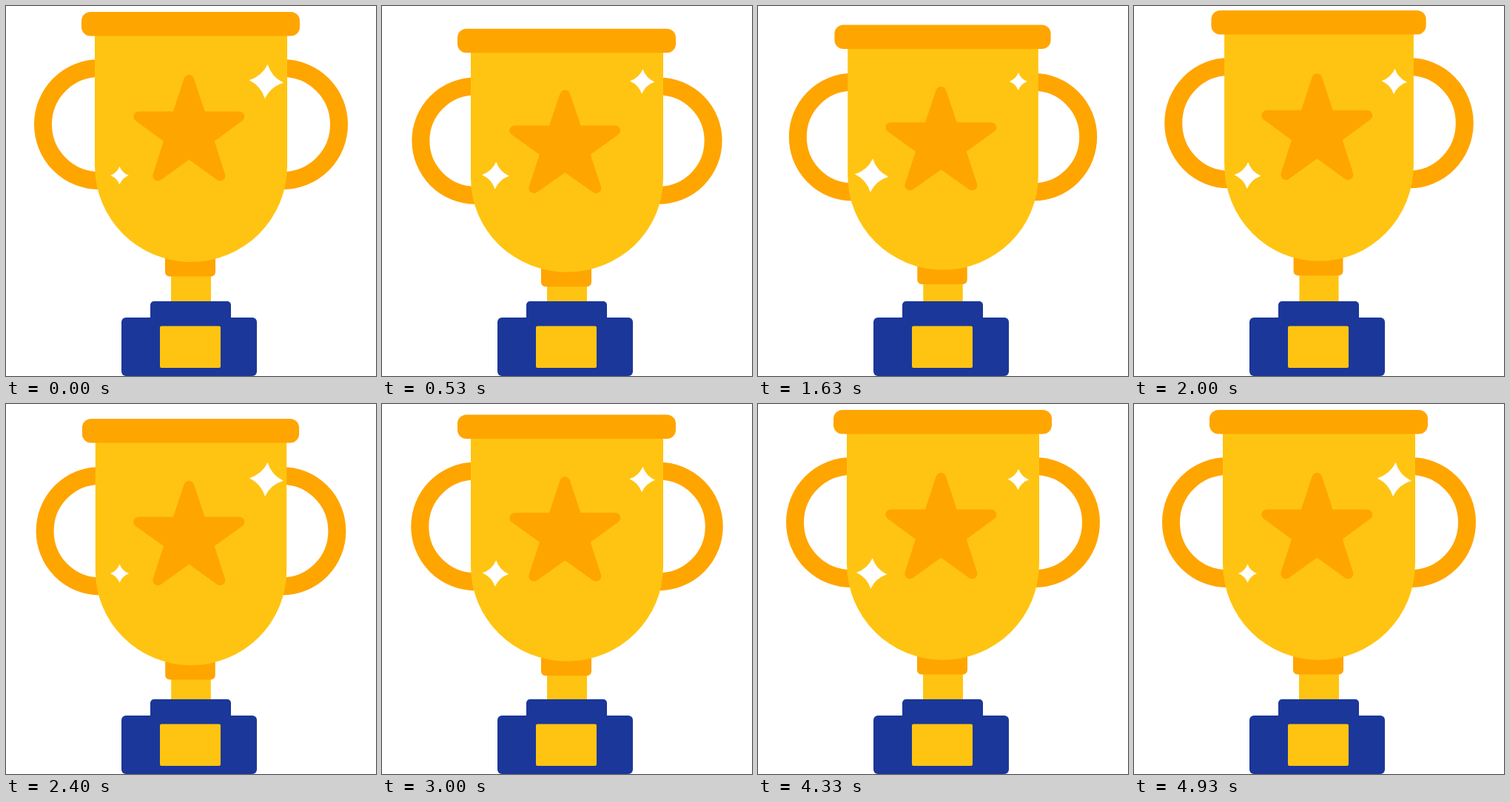
Recreate the animation shown at these times as an HTML page with a canvas. Size 500 by 500 pixels, loop 5010 ms.

```html
<!DOCTYPE html>
<html lang="en">
<head>
<meta charset="utf-8">
<title>Trophy</title>
<style>
html, body { margin: 0; height: 100%; overflow: hidden; background: #fff; }
canvas { display: block; width: 100vmin; height: 100vmin; }
</style>
</head>
<body>
<canvas id="stage" width="500" height="500"></canvas>
<script>
const ctx = document.getElementById('stage').getContext('2d');
const LOOP = 5010;
const YELLOW = '#ffc412', ORANGE = '#ffa500', BLUE = '#1b3799';
const CENTER = 249.7;

// Tracks of [time, value], eased with a half cosine between keys
const rimShift = [[0, 0], [1040, 44], [2150, -4], [2580, 21.5], [3250, 0]];
const bowlShift = [[0, 0], [1040, 26.5], [2150, -2.4], [2580, 12.7], [3140, 0]];
const widthScale = [[0, 1], [1040, 1], [2150, 0.983], [2580, 1]];

function sample(track, t) {
  const i = track.findIndex(key => key[0] > t);
  if (i < 0) return track[track.length - 1][1];
  const [t0, v0] = track[i - 1], [t1, v1] = track[i];
  return v0 + (v1 - v0) * (1 - Math.cos(Math.PI * (t - t0) / (t1 - t0))) / 2;
}

function box(color, x0, y0, x1, y1, radii) {
  ctx.fillStyle = color;
  ctx.beginPath();
  ctx.roundRect(x0, y0, x1 - x0, y1 - y0, radii);
  ctx.fill();
}

function star(cx, cy, sy) {
  ctx.save();
  ctx.translate(cx, cy);
  ctx.scale(1, sy);
  ctx.beginPath();
  for (let i = 0; i < 10; i++) {
    const r = i % 2 ? 27.5 : 71.5, a = i * Math.PI / 5;
    ctx.lineTo(r * Math.sin(a), -r * Math.cos(a));
  }
  ctx.closePath();
  ctx.fillStyle = ctx.strokeStyle = ORANGE;
  ctx.lineWidth = 14;
  ctx.lineJoin = 'round';
  ctx.fill();
  ctx.stroke();
  ctx.restore();
}

function sparkle(cx, cy, size, angle) {
  const c = size * 0.28;
  ctx.save();
  ctx.translate(cx, cy);
  ctx.rotate(angle);
  ctx.beginPath();
  ctx.moveTo(0, -size);
  ctx.quadraticCurveTo(c, -c, size, 0);
  ctx.quadraticCurveTo(c, c, 0, size);
  ctx.quadraticCurveTo(-c, c, -size, 0);
  ctx.quadraticCurveTo(-c, -c, 0, -size);
  ctx.fillStyle = '#fff';
  ctx.fill();
  ctx.restore();
}

function cup(t) {
  const top = sample(rimShift, t), bottom = sample(bowlShift, t), sx = sample(widthScale, t);
  const sy = 1 + (bottom - top) / 338;
  const X = x => CENTER + (x - CENTER) * sx;
  const Y = y => 8 + top + (y - 8) * sy;

  box(YELLOW, X(223), Y(340), X(277), 402, 0);
  box(ORANGE, X(215), Y(330), X(283), 365.5 + bottom, [0, 0, 6, 6]);

  ctx.strokeStyle = ORANGE;
  ctx.lineWidth = 24;
  for (const x of [126, 374]) {
    const r = 88 * sy;
    ctx.beginPath();
    ctx.ellipse(X(x), Y(160) + top * 0.15, r * sx - 12, r - 12, 0, 0, 2 * Math.PI);
    ctx.stroke();
  }

  ctx.fillStyle = YELLOW;
  ctx.beginPath();
  ctx.moveTo(X(120), Y(20));
  ctx.lineTo(X(120), Y(216));
  ctx.ellipse(X(250), Y(216), 130 * sx, 130 * sy, 0, Math.PI, 0, true);
  ctx.lineTo(X(380), Y(20));
  ctx.fill();

  box(ORANGE, X(102), 8 + top, X(397), 40.5 + top, 12);
  star(X(247.3), Y(171.5), sy);
}

function base() {
  box(BLUE, 195, 399, 304, 425, [5, 5, 0, 0]);
  box(BLUE, 156, 421, 339, 500, 6);
  box(YELLOW, 208, 432.5, 290, 489, 2);
}

function sparkles(t) {
  const glow = ((1 + Math.cos(4 * Math.PI * t / LOOP)) / 2) ** 1.6;
  sparkle(351.8, 102, 11 + 12.3 * glow, 0.08 * glow);
  sparkle(153.5, 229, 12.3 + 11.4 * (1 - glow), 0.08 * (1 - glow));
}

function draw(now) {
  const t = now % LOOP;
  ctx.fillStyle = '#fff';
  ctx.fillRect(0, 0, 500, 500);
  cup(t);
  base();
  sparkles(t);
}

const start = performance.now();
function tick() {
  draw(performance.now() - start);
  requestAnimationFrame(tick);
}
tick();
</script>
</body>
</html>
```
